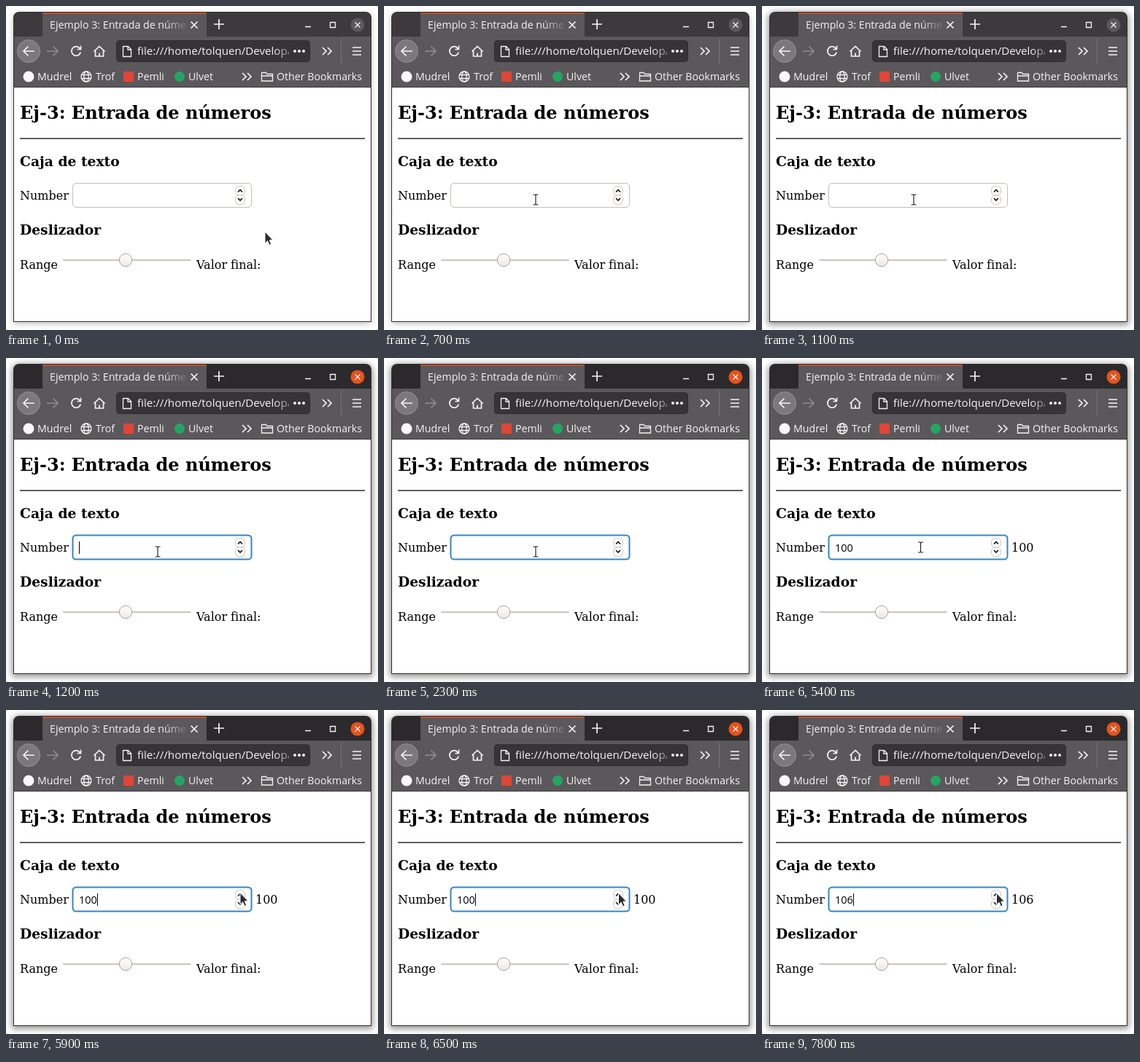
An HTML page that plays this animation: 510x445 px, repeating every 8 s.

```html
<!DOCTYPE html>
<html lang="es">
<head>
<meta charset="utf-8">
<title>Entrada de números</title>
<style>
  html, body { margin: 0; width: 100%; height: 100%; overflow: hidden; background: #fff; }
  #shadow {
    position: absolute; left: 10px; top: 8px; width: 491px; height: 426px;
    border-radius: 8px 8px 0 0; box-shadow: 0 2px 8px rgba(0, 0, 0, .26);
  }
  #shadow.strong { box-shadow: 0 2px 9px 2px rgba(0, 0, 0, .42); }
  svg { position: absolute; left: 0; top: 0; display: block; }
  text { white-space: pre; }
  .ui { font: 14.2px "Open Sans", "Noto Sans", sans-serif; fill: #f4f3f2; }
  .url { font-size: 15.1px; }
  .page { font: 16px "DejaVu Serif", serif; fill: #000; }
  .h2 { font-size: 24px; font-weight: bold; }
  .h3 { font-size: 18.72px; font-weight: bold; }
  #field { font: 500 14.5px "Open Sans", "Noto Sans", sans-serif; fill: #000; }
  .line { fill: none; stroke: #f4f3f2; stroke-width: 1.7; }
  .thin { stroke-width: 1.3; }
  #bar { fill: #3d3a3d; }
  #close { fill: #5b585b; }
  #box { fill: #fff; stroke: #c4beb8; stroke-width: 1; }
  .focus #bar { fill: #2c292c; }
  .focus #close { fill: #e4531f; }
  .focus #box { stroke: #3a83bb; stroke-width: 2; }
  .spin { fill: #fff; stroke: #cbc6c0; }
  .chevron { fill: none; stroke: #111; stroke-width: 1.7; }
</style>
</head>
<body>
<div id="shadow"></div>
<svg id="stage" width="510" height="445" viewBox="0 0 510 445">
  <defs>
    <linearGradient id="tabFade" gradientUnits="userSpaceOnUse" x1="218" x2="247">
      <stop stop-color="#f4f3f2"/><stop offset="1" stop-color="#f4f3f2" stop-opacity=".1"/>
    </linearGradient>
    <linearGradient id="urlFade" gradientUnits="userSpaceOnUse" x1="368" x2="389">
      <stop stop-color="#f4f3f2"/><stop offset="1" stop-color="#f4f3f2" stop-opacity=".35"/>
    </linearGradient>
    <linearGradient id="knob" x2="0" y2="1">
      <stop stop-color="#fff"/><stop offset="1" stop-color="#ebe9e6"/>
    </linearGradient>
    <clipPath id="urlClip"><path d="M151 47h237v30h-237z"/></clipPath>
    <clipPath id="tabClip"><path d="M50 9h197v33h-197z"/></clipPath>
  </defs>

  <!-- Window frame -->
  <path fill="#302d30" d="M10 434V16a8 8 0 0 1 8-8h475a8 8 0 0 1 8 8v418z"/>
  <path id="bar" d="M11 42V16a7 7 0 0 1 7-7h475a7 7 0 0 1 7 7v26z"/>
  <path fill="#5b585b" d="M11 42h39V9h225v33h225v70H11z"/>
  <path fill="#b4532f" d="M50 9h225v2H50z"/>
  <path fill="#3b383b" d="M11 111h489v1H11z"/>
  <path fill="#fff" d="M11 112h489v321H11z"/>

  <!-- Tab strip -->
  <text class="ui" x="60" y="31" style="fill:url(#tabFade)" clip-path="url(#tabClip)">Ejemplo 3: Entrada de números</text>
  <path class="line" d="M253.500 21.500l9 9m0-9l-9 9M292 18v14m-7-7h14"/>
  <path class="line thin" d="M410 28.500h8M444.500 22.500h7v7h-7z"/>
  <circle id="close" cx="482" cy="26" r="9.500"/>
  <path class="line thin" d="M478.500 22.500l7 7m0-7l-7 7"/>

  <!-- Toolbar -->
  <circle cx="31" cy="62" r="15.500" fill="#7b787b" stroke="#969396"/>
  <path class="line" stroke-width="2" d="M39 62H24m6.500-6.500L24 62l6.500 6.500"/>
  <path class="line" style="stroke:#8d8a8d" d="M56 62h15m-6.500-6.500L71 62l-6.500 6.500"/>
  <path class="line" d="M101.500 58.500a6.300 6.300 0 1 0 .800 5M102.500 54.500v5h-5"/>
  <path class="line" d="M120.500 62.500L128 55.500l7.500 7M122.500 61.500v7.500h11v-7.500M128 69v-4.500"/>
  <rect x="151.500" y="47.500" width="265" height="29" rx="4" fill="#373437" stroke="#2f2c2f"/>
  <path class="line thin" d="M160.500 55.500h7l4 4v10h-11zM167 55.500v4.500h4.500"/>
  <text class="ui url" x="180" y="67" style="fill:url(#urlFade)" clip-path="url(#urlClip)">file:///home/tolquen/Develop/</text>
  <g fill="#f4f3f2">
    <circle cx="396" cy="62" r="2"/><circle cx="402" cy="62" r="2"/><circle cx="408" cy="62" r="2"/>
  </g>
  <path class="line" d="M434 57l5 5-5 5m7-10l5 5-5 5"/>
  <path stroke="#777477" d="M459.500 45v34"/>
  <path class="line" d="M475 57h12m-12 5h12m-12 5h12"/>

  <!-- Bookmarks -->
  <circle cx="31" cy="97" r="7.500" fill="#f8f8f8"/>
  <g class="line thin">
    <circle cx="110" cy="97" r="7"/><ellipse cx="110" cy="97" rx="3.300" ry="7"/>
    <path d="M103.500 94.500h13m-13 5h13"/>
  </g>
  <path fill="#df4538" d="M161 90h14v14h-14z"/>
  <circle cx="238" cy="97" r="7" fill="#25a562"/>
  <g class="ui">
    <text x="43" y="102">Mudrel</text>
    <text x="123" y="102">Trof</text>
    <text x="180" y="102">Pemli</text>
    <text x="250" y="102">Ulvet</text>
    <text x="371" y="102">Other Bookmarks</text>
  </g>
  <path class="line" d="M324 92l5 5-5 5m7-10l5 5-5 5"/>
  <path class="line thin" d="M351 91.500h5l2 2h7.500v9.500H350.500v-11zM350.500 96h15"/>

  <!-- Page -->
  <g class="page">
    <text class="h2" x="19" y="155">Ej-3: Entrada de números</text>
    <path fill="#5f5f5f" d="M19 181h473v2H19z"/>
    <text class="h3" x="19" y="220">Caja de texto</text>
    <text x="19" y="266">Number</text>
    <text id="output" x="342" y="266"></text>
    <text class="h3" x="19" y="314">Deslizador</text>
    <text x="19" y="361">Range</text>
    <text x="261" y="361">Valor final:</text>
  </g>
  <rect id="box" x="91.500" y="243.500" width="245" height="33" rx="4.500"/>
  <rect class="spin" x="314.500" y="247.500" width="13" height="12.500" rx="5"/>
  <rect class="spin" x="314.500" y="260" width="13" height="12.500" rx="5"/>
  <path class="chevron" d="M318 255.500l3-3 3 3M318 264l3 3 3-3"/>
  <text id="field" x="100" y="266"></text>
  <rect id="caret" y="252" width="1" height="17"/>
  <rect x="78" y="348" width="176" height="2" rx="1" fill="#cbc5be"/>
  <circle cx="164" cy="349" r="8.700" fill="url(#knob)" stroke="#aaa59e"/>

  <!-- Pointers -->
  <path id="arrow" fill="#2b2b2b" stroke="#fff" d="M0 0V16L3.600 12.700 6 18.300 8.700 17.200 6.300 11.600H11z"/>
  <g id="beam" fill="none">
    <path stroke="#fff" stroke-width="2.600" d="M-3.500-7h2.500l1 1 1-1h2.500M0-6V6M-3.500 7h2.500l1-1 1 1h2.500"/>
    <path stroke="#222" stroke-width="1.200" d="M-3.500-7h2.500l1 1 1-1h2.500M0-6V6M-3.500 7h2.500l1-1 1 1h2.500"/>
  </g>
</svg>
<script>
  const LOOP = 8000;
  const $ = id => document.getElementById(id);

  // time, pointer, x, y
  const moves = [
    [0, 'arrow', 355, 310], [400, 'arrow', 283, 304],
    [600, 'beam', 220, 271], [700, 'beam', 208, 266],
    [5400, 'beam', 217.5, 260], [5500, 'beam', 242, 258],
    [5600, 'beam', 276, 261], [5700, 'beam', 303, 265],
    [5800, 'arrow', 318, 260], [5900, 'arrow', 321, 251],
    [6000, 'arrow', 321, 243], [6100, 'arrow', 321, 238],
    [6400, 'arrow', 321, 245], [6500, 'arrow', 321.5, 251.5]
  ];
  const typed = [[0, ''], [3000, '1'], [3600, '100']];
  const blinks = [1200, 2300, 3000, 4700, 5800];
  const presses = [6800, 7000, 7200, 7400, 7500, 7700];
  const releases = [6900, 7100, 7300, 7400, 7500, 7800];

  const passed = (times, t) => times.filter(s => s <= t).length;
  const latest = (rows, t) => rows[passed(rows.map(r => r[0]), t) - 1];
  const show = (el, on) => el.style.visibility = on ? 'visible' : 'hidden';
  const write = (el, s) => { if (el.textContent !== s) el.textContent = s; };

  function draw(t) {
    const [, kind, x, y] = latest(moves, t);
    for (const id of ['arrow', 'beam']) show($(id), id === kind);
    $(kind).setAttribute('transform', `translate(${x} ${y})`);

    $('shadow').classList.toggle('strong', t >= 1100);
    $('stage').classList.toggle('focus', t >= 1200);

    const clicks = passed(presses, t);
    const value = clicks ? String(100 + clicks) : latest(typed, t)[1];
    write($('field'), value);
    write($('output'), t < 4700 ? '' : String(100 + passed(releases, t)));

    $('caret').setAttribute('x', 100 + Math.round(value.length * 8.3));
    show($('caret'), passed(blinks, t) % 2);
  }

  const start = performance.now();
  function tick() {
    draw((performance.now() - start) % LOOP);
    requestAnimationFrame(tick);
  }
  tick();
</script>
</body>
</html>
```
